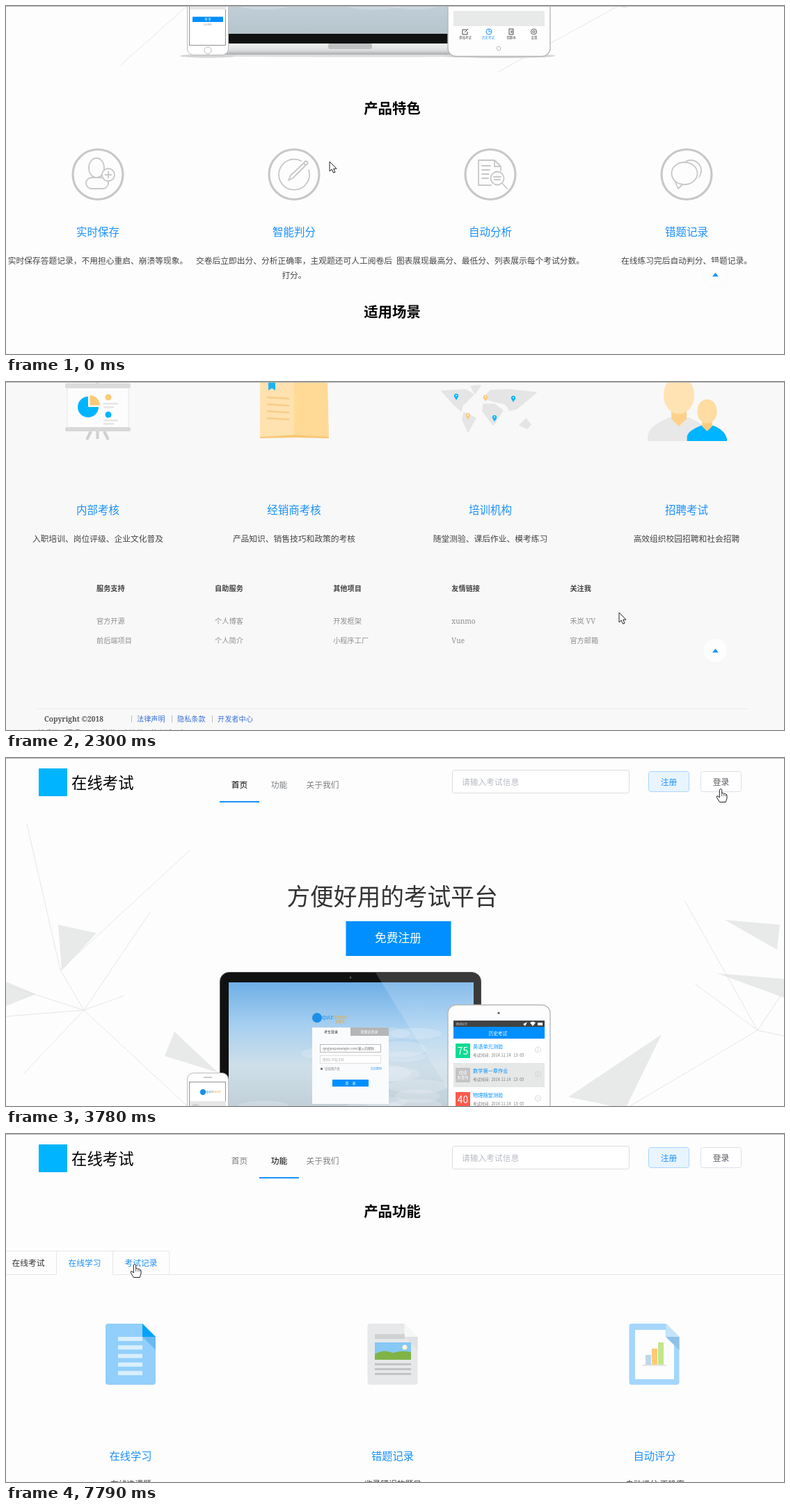
Recreate the animation shown at these times as an HTML page. Size 1118 by 501 pixels, loop 8 s.

```html
<!DOCTYPE html>
<html lang="zh-CN">
<head>
<meta charset="utf-8">
<style>
html, body { margin: 0; width: 100%; height: 100%; overflow: hidden; background: #fdfdfd; }
svg { display: block; width: 1118px; height: 501px; }
text { font-family: "Noto Sans CJK SC", "Noto Sans CJK", sans-serif; white-space: pre; }
.slab { font-family: "Noto Serif", "Noto Sans CJK SC", "Noto Sans CJK", serif; }
.thin { stroke: #c8c8c8; stroke-width: 1.8; stroke-linecap: round; stroke-linejoin: round; }
.login.on rect { fill: #e8f4ff; stroke: #badeff; }
.login.on text, .record.on text { fill: #1890ff; }
.feature.on text { fill: #000; }
</style>
</head>
<body>
<svg id="stage" viewBox="0 0 1118 501"></svg>
<script>
const BLUE = '#1890ff', FILL = '#008fff', SKY = '#00b4ff', INK = '#444', PAPER = '#fdfdfd';
const THIN = 'class="thin"';

const rect = (x, y, w, h, fill, extra = '') =>
  `<rect x="${x}" y="${y}" width="${w}" height="${h}" fill="${fill}" ${extra}/>`;
const poly = (pts, fill, extra = '') => `<polygon points="${pts}" fill="${fill}" ${extra}/>`;
const path = (d, fill, extra = '') => `<path d="${d}" fill="${fill}" ${extra}/>`;
const oval = (x, y, rx, ry, fill, extra = '') =>
  `<ellipse cx="${x}" cy="${y}" rx="${rx}" ry="${ry}" fill="${fill}" ${extra}/>`;
const dot = (x, y, r, fill, extra) => oval(x, y, r, r, fill, extra);
const stroke = (c, w = 1) => `stroke="${c}" stroke-width="${w}"`;
const line = (d, extra = THIN) => path(d, 'none', extra);
// y is the middle of the glyphs
const text = (x, y, size, str, fill = INK, extra = '') =>
  `<text x="${x}" y="${y + size * .38}" font-size="${size}" fill="${fill}" ${extra}>${str}</text>`;
const mid = (x, y, size, str, fill, extra = '') =>
  text(x, y, size, str, fill, 'text-anchor="middle" ' + extra);
const heading = (y, str) => mid(555, y, 20.4, str, '#000', 'font-weight="700"');
const group = (dy, part) => `<g transform="translate(0 ${dy})">${part}</g>`;
const each = (list, fn) => list.map(fn).join('');
const repeat = (n, fn) => each([...Array(n).keys()], fn);
const bars = (n, x, y, gap, w, h, fill) => repeat(n, i => rect(x, y + gap * i, w, h, fill));

let seed = 7;
const random = (a, b) => a + (b - a) * ((seed = seed * 16807 % 2147483647) / 2147483647);

function header(active) {
  const nav = (s, i) => `<g class="${i == 1 ? 'feature' : ''}">` +
    mid(335.5 + 57 * i + 5.5 * (i > 1), 38.5, 11.75, s, i == active ? '#000' : '#7c7e82', 'font-weight="500"') + '</g>';
  return rect(47, 15, 41, 40, SKY) + text(94, 35.5, 22.4, '在线考试', '#000') +
    each(['首页', '功能', '关于我们'], nav) + rect(307 + 57 * active, 62, 57, 2, BLUE) +
    rect(641.5, 17.5, 254, 33, '#fff', 'rx="3" ' + stroke('#d9dce2')) +
    text(655, 34.5, 11.75, '请输入考试信息', '#b6bac3') +
    rect(923.5, 19.5, 58, 29, '#e8f4ff', 'rx="3" ' + stroke('#a8d5ff')) + mid(952.5, 34.5, 11.75, '注册', BLUE) +
    '<g class="login">' + rect(998.5, 19.5, 58, 29, '#fff', 'rx="3" ' + stroke('#dcdfe6')) +
    mid(1027.5, 34.5, 11.75, '登录', '#55585e') + '</g>';
}

// a web of thin lines around two hubs, with a few grey shards
function backdrop() {
  const webs = [['112 363', ['207 222', '78 305', '0 327', '0 372', '25 455', '170 342', '270 510']],
    ['78 305', ['30 95', '265 132']],
    ['1080 392', ['975 205', '1118 335', '1118 400', '890 505', '990 325']]];
  const shards = ['75,240 130,252 80,306', '0,322 43,340 0,357', '242,394 228,429 305,453',
    '1033,233 1112,240 1108,276', '1022,310 1118,318 1118,345', '942,398 808,488 890,505'];
  return each(shards, p => poly(p, '#e8eaea')) +
    each(webs, ([hub, ends]) => line(each(ends, e => `M${hub}L${e}`), stroke('#e0e0e0', .8))) +
    line('M880 502L707 597M260 502L165 587', stroke('#e0e0e0', .8));
}

const brand = (x, y, k) => dot(x, y, 7 * k, '#1c8fe8') +
  text(x + 7 * k, y - k, 8 * k, 'quiz<tspan fill="#f5a623">moor</tspan>', '#1c8fe8');

function laptop() {
  const cloud = () => oval(random(370, 610), random(390, 510), random(30, 50), random(5, 14), '#f4f7f8', 'opacity=".22"');
  return oval(520, 573, 270, 2.5, '#ddd') +
    rect(307.5, 308.500, 375, 255, '#111', 'rx="13" ' + stroke('#555')) +
    rect(320, 323, 352, 219, 'url(#sky)') + repeat(14, cloud) +
    poly('531,309 676,309 682,318 682,540 652,505', '#fff', 'opacity=".17"') +
    dot(495, 316, 1.5, '#555') +
    path('M262 556H690V567Q680 572 650 572H290Q265 572 262 566Z', 'url(#metal)') +
    rect(463, 556, 63, 8, '#bfc1c2', 'rx="3"') +
    brand(447, 374, 1) + mid(480, 379, 4.5, '答题台', '#f5a623') +
    rect(440, 388, 110, 110, '#fafbfc') + rect(495, 388, 55, 12, '#b4b6b8') +
    mid(467, 394, 5, '考生登录', '#333') + mid(522, 394, 5, '管理员登录', '#fff') +
    rect(451.5, 412.5, 87, 11, '#fff', stroke('#aaa', .8)) + text(455, 418, 4.6, 'qinglan@example.com/输入的密码', '#666') +
    rect(451.5, 428.5, 87, 11, '#fff', stroke('#ccc', .6)) + text(455, 434, 4.4, '密码6-20位字符', '#aaa') +
    rect(452, 446, 3, 3, '#777') + text(458, 447.5, 4.4, '记住用户名', '#777') + text(524, 447.5, 4, '忘记密码', BLUE) +
    rect(469, 463, 52, 10, FILL) + mid(495, 468, 5, '登　录', '#fff');
}

function phone() {
  return oval(290, 574, 40, 2.5, '#d5d5d5') +
    rect(260.5, 453.5, 59, 119, '#fff', 'rx="9" ' + stroke('#b9bbbc')) + rect(284, 459, 12, 1.5, '#bbb') +
    rect(263.5, 466.5, 52, 92, '#fff', stroke('#777', .8)) +
    brand(283, 481, .6) + rect(264, 494, 52, 13, '#e5e7e8') +
    text(268, 500, 3.5, '请输入', '#aaa') + rect(268, 517.5, 44, 7.500, FILL) + mid(290, 521, 4, '登 录', '#fff') +
    mid(290, 529, 3, '忘记密码', '#999') + dot(290, 566, 5, '#fff', stroke('#b9bbbc'));
}

function tablet() {
  const row = ([name, score, color], i) => {
    const y = 404 + 35 * i;
    return rect(643, y, 131, 35, i == 1 ? '#e6e8e8' : '#fff') + rect(646, y + 7, 21, 21, color) +
      (score ? mid(656.5, y + 17.5, 14, score, '#fff')
        : mid(656.5, y + 14, 6, '成绩', '#fff') + mid(656.5, y + 21, 5.5, '未发布', '#fff')) +
      text(671, y + 11, 7.2, name, FILL) + text(671, y + 24, 5.6, '考试时间:  2014.11.14   13: 05', '#777') +
      dot(764.5, y + 16, 4, 'none', stroke('#ccc', .7)) + line(`M763.5 ${y + 14}l2 2l-2 2`, stroke('#bbb', .6));
  };
  const tab = (s, i) => mid(660 + 33 * i, 547, 4.4, s, i == 1 ? BLUE : '#444');
  return oval(709, 574, 80, 3, '#d5d5d5') +
    rect(635, 355.5, 147, 219, PAPER, 'rx="12" ' + stroke('#b5b7b8', 1.4)) + dot(708, 367, 1.6, '#555') +
    rect(643, 378, 131, 174, '#e8e9e9') + rect(643, 378, 131, 9, '#404244') +
    text(647, 383, 4, '移动信号', '#ddd') + poly('743,383 749,380 746,386', '#fff') +
    path('M753 381Q757 378 761 381L757 386Z', '#fff') + rect(764, 381, 7, 4, '#fff') +
    rect(643, 387, 131, 17, FILL) + mid(707, 396, 6.6, '历史考试', '#fff') +
    each([['英语单元测验', '75', '#0edc92'], ['数学第一章作业', '', '#c4c4c4'], ['物理随堂测验', '40', '#ff5a4d']], row) +
    rect(643, 531, 131, 21, '#fff') + each(['参加考试', '历史考试', '错题本', '设置'], tab) +
    line('M662 536H656V543H663V539M659 540L664 535M723 535H729V543H723ZM725 538H728M725 540H728', stroke('#444')) +
    dot(694, 539, 4, 'none', stroke(BLUE)) + line('M694 536V539H697', stroke(BLUE)) +
    dot(758.5, 539, 4, 'none', stroke('#555')) + dot(758.5, 539, 1.6, 'none', stroke('#555')) +
    rect(705.5, 560.5, 5, 5, 'none', 'rx="1" ' + stroke('#bbb'));
}

const column = i => 132 + 282 * i;
const cards = (rows, labelY, descY) => each(rows, ([label, ...desc], i) =>
  mid(column(i), labelY, 15.5, label, BLUE) +
  each(desc, (s, k) => mid(column(i), descY + 21 * k, 11.75, s, '#444')));

function features() {
  const user = rect(115, 247, 32, 16, PAPER, 'rx="8" ' + THIN) + oval(130, 233, 11, 14, PAPER, THIN) +
    dot(147, 243, 9, PAPER, THIN) + line('M142.5 243H151.5M147 238.5V247.5');
  const pencil = line('M424 223A22 22 0 1 0 435 236M406 251L409 244L428 226L431 229L413 247Z') + dot(431, 226, 2.5, PAPER, THIN);
  const report = line('M697 258H679V222H702L711 231V237M702 222V231H711') +
    repeat(4, i => line(`M684 ${230 + 6 * i}H${696 - i}`)) +
    dot(706, 248, 9.5, PAPER, THIN) + line('M713 255L720 263M701 246H711M702 250H710');
  const chat = oval(984, 237, 15, 15, 'none', THIN) + oval(975, 242, 21, 18, PAPER, 'stroke="#fdfdfd"') +
    line('M962 254L966 263L972 257') + oval(975, 241, 18.5, 16, PAPER, THIN);
  return heading(147.5, '产品特色') +
    repeat(4, i => dot(column(i), 242.5, 36, 'none', stroke('#c8c8c8', 3.2))) + user + pencil + report + chat +
    cards([['实时保存', '实时保存答题记录，不用担心重启、崩溃等现象。'],
      ['智能判分', '交卷后立即出分、分析正确率，主观题还可人工阅卷后', '打分。'],
      ['自动分析', '图表展现最高分、最低分、列表展示每个考试分数。'],
      ['错题记录', '在线练习完后自动判分、错题记录。']], 325, 366.5) +
    heading(440.5, '适用场景');
}

const pin = (x, y, c) => path(`M${x} ${y + 5}l-3 -5a3.2 3.2 0 1 1 6 0Z`, c) + dot(x, y - 1.5, 1, '#fff');

function person(x, top, k, skin, shade, shirt) {
  const y = top + 93 * k;
  return path(`M${x - 45 * k} 171V165Q${x - 44 * k} ${y - 22 * k} ${x - 14 * k} ${y - 34 * k}H${x + 14 * k}` +
    `Q${x + 44 * k} ${y - 22 * k} ${x + 45 * k} 171Z`, shirt) +
    path(`M${x - 11 * k} ${y - 48 * k}h${22 * k}v${16 * k}l${-11 * k} ${11 * k}l${-11 * k} ${-11 * k}Z`, shade) +
    rect(x - 22 * k, top, 44 * k, 54 * k, skin, `rx="${22 * k}" ry="${26 * k}"`);
}

function scenes() {
  const board = rect(129, 79, 5, 10, '#d8d8d8', 'rx="2"') +
    line('M122 157L116 169M131.5 157V168M141 157L147 169', stroke('#d0d0d0', 4)) +
    rect(88, 94, 88, 58, '#fcfcfc', stroke('#e6e6e6')) +
    rect(85, 88, 94, 7, '#dcdcdc', 'rx="2"') + rect(85, 151, 94, 6, '#d8d8d8', 'rx="2"') +
    path('M118 122v-15a15 15 0 1 0 15 15Z', SKY) + path('M120.5 119.5v-14.5a15 15 0 0 1 14.500 14.500Z', '#ffc978') +
    dot(147, 108, 4.5, '#ffc978') + dot(147, 133, 4.5, SKY) + bars(2, 140, 116, 24, 21, 2.5, '#e6e6e6') +
    bars(2, 140, 121, 24, 15, 2.5, '#e6e6e6');
  const book = poly('365,82 414,85 414,164 365,167', '#ffe2b0') + poly('414,85 462,81 464,167 414,164', '#ffd996') +
    poly('365,165 414,162 464,165 464,167 414,166 365,167', '#f8c778') + poly('377,82 387,82 387,98 382,95 377,98', '#1cb3f2') +
    repeat(4, i => line(`M375 ${108 + 10 * i}l32 2`, stroke('#f8cd86', 2.5)));
  const land = ['626,99 660,97 672,104 656,120 654,128 643,118', '668,92 682,91 674,103', '658,130 675,138 664,158 656,140',
    '686,110 696,98 722,97 762,101 735,124 724,127 718,118', '686,118 702,118 714,127 700,148 685,128', '738,148 747,139 754,147 749,153'];
  const map = each(land, p => poly(p, '#e5e5e5', stroke('#e5e5e5', 1.5) + ' stroke-linejoin="round"')) +
    pin(647, 107, SKY) + pin(729, 110, SKY) + pin(702, 138, SKY) + pin(689, 109, '#ffc978') + pin(664, 135, '#ffc978');
  const links = [['服务支持', '官方开源', '前后端项目'], ['自助服务', '个人博客', '个人简介'],
    ['其他项目', '开发框架', '小程序工厂'], ['友情链接', 'xunmo', 'Vue'], ['关注我', '禾岚 VV', '官方邮箱']];
  const link = (x, s, k) => k ? text(x, 403 + 27.5 * k, 10.2, s, '#8f8f8f', 'class="slab"')
    : text(x, 383, 10.2, s, '#444', 'font-weight="700"');
  return rect(0, 28, 1118, 700, '#f8f8f8') + board + book + map +
    person(967, 78, 1, '#ffe3b3', '#ffd18a', '#e8e8e8') + person(1007.5, 111, .64, '#ffdca2', '#ffcb7c', SKY) +
    cards([['内部考核', '入职培训、岗位评级、企业文化普及'], ['经销商考核', '产品知识、销售技巧和政策的考核'],
      ['培训机构', '随堂测验、课后作业、模考练习'], ['招聘考试', '高效组织校园招聘和社会招聘']], 270.5, 312) +
    each(links, (col, i) => each(col, (s, k) => link(130 + 170.1 * i, s, k)));
}

function footer() {
  return rect(45, 470, 1021, 1, '#ebebeb') + text(55, 485.5, 10.2, 'Copyright ©2018', '#555', 'class="slab" font-weight="700"') +
    each(['法律声明', '隐私条款', '开发者中心'], (s, i) =>
      rect(180 + 58 * i, 480, 1, 10, '#bbb') + text(188 + 58 * i, 485.5, 10.2, s, '#3b73d6')) +
    text(45, 505, 10.2, '前后端开源项目，仅供学习交流使用的考试平台', '#777');
}

const home = () => header(0) + backdrop() +
  mid(555, 199.5, 33.7, '方便好用的考试平台', '#333') +
  rect(488.5, 235, 151, 50, FILL) + mid(563.5, 259, 16.8, '免费注册', '#fff') +
  laptop() + phone() + tablet() + group(502, features()) + group(975, scenes()) + group(1061, footer());

const floppy = () => rect(143, 281, 72, 72, '#8ccbf8', 'rx="3"') +
  rect(155, 281, 48, 29, '#e6e8ea') + poly('168,281 203,281 203,310 196,310', '#d9dbdd') + rect(187, 288, 11, 18, '#64b5f0') +
  rect(155, 319, 48, 34, '#e9ebec') + bars(2, 163, 326, 8, 32, 3, '#d3d5d6') + rect(163, 343, 25, 3, '#d3d5d6');

const notepad = () => path('M519 288H576V304H592V353H522Q519 353 519 350Z', '#e9ebec') +
  path('M519 290L575 347L560 353H522Q519 353 519 350Z', '#dcdddf') + poly('576,304 576,320 592,304', '#dcdddf') +
  `<g transform="translate(524 287) rotate(44)">${rect(-3, -10, 17, 20, '#bdbfc1', 'rx="6"')}${rect(8, -10, 9, 20, '#9ccc50')}` +
  `${rect(17, -10, 39, 20, '#8ccbf8')}${rect(17, 3, 39, 7, '#559bd6')}${poly('56,-10 69,0 56,10', '#f3c67b')}${poly('64,-4 69,0 64,4', '#444')}</g>`;

const printer = () => rect(895, 313, 74, 41, '#e7e9ea', 'rx="4"') +
  path('M903 283Q903 279 907 279H945L962 296V330H903Z', '#8ccbf8') + poly('945,279 962,296 945,296', '#42a9f2') +
  rect(898, 329, 68, 5, '#b9bbbd') + mid(932, 308, 28, 'A', '#fff', 'style="font-family:Roboto,sans-serif"') +
  repeat(3, i => dot(906 + 9 * i, 343, 3, i ? '#9ccc50' : '#ff7c55'));

const sheet = (x, fill, fold, shade) =>
  path(`M${x} 277q0 -4 4 -4h49l19 19v65q0 4 -4 4h-64q-4 0 -4 -4Z`, fill) +
  poly(`${x + 53},292 ${x + 72},292 ${x + 72},311`, shade) + poly(`${x + 53},273 ${x + 72},292 ${x + 53},292`, fold);

const lesson = () => sheet(143, '#93cffc', '#00a2fb', '#6bb9f0') + bars(5, 161, 292, 12.3, 35, 6, '#d9effe');

const article = () => sheet(519.5, '#e6e8e9', '#f6f7f7', '#dfe1e2') + rect(530, 288, 43, 7, '#cfd1d2') +
  rect(530, 300, 52, 25, '#86c8f6') + dot(573, 307, 3.5, '#fff6d8') +
  path('M530 317Q542 309 556 315Q570 311 582 314V325H530Z', '#80b347') + bars(3, 530, 330, 7, 52, 3, '#c1c3c4');

const chart = () => sheet(895.5, '#a5d6fc', '#c4e4fd', '#8fc1e8') + path('M904 282H948V292L960 304V353H904Z', PAPER) +
  each(['#bcd8ea', '#ffc978', '#c2e58b'], (c, i) => rect(919 + 9 * i, 318 - 9 * i, 8, 14 + 9 * i, c)) + rect(915, 332, 34, 2, '#e4e4e4');

function panel(active) {
  const tab = (s, i) => `<g class="${i == 2 ? 'record' : ''}">` +
    mid(32 + 81 * i, 186, 11.75, s, i == active ? BLUE : '#333') + '</g>';
  const base = active ? 'M0 202.5H72.5M153.5 202.5H1118' : 'M72.5 202.5H1118';
  const items = active
    ? [['在线学习', '在线选课题'], ['错题记录', '收录错误的题目'], ['自动评分', '自动评分 正确率']]
    : [['最近发布', '查看、参与最近发布的考试'], ['模拟考试', '主观题、用户考生所答填题手动评分'], ['考试记录', '查看参与的考试记录、做到错题']];
  return each(['在线考试', '在线学习', '考试记录'], tab) +
    line('M0 168.5H232Q235 168.5 235 171V202M72.5 168.5V202M153.5 168.5V202' + base, stroke('#e4e7ea')) +
    (active ? lesson() + article() + chart() : floppy() + notepad() + printer()) +
    each(items, ([a, b], i) => mid(179 + 376.5 * i, 463, 15.3, a, BLUE) + mid(179.5 + 376.5 * i, 504, 11.75, b));
}

const stage = document.getElementById('stage');
stage.innerHTML = `<defs>
  <linearGradient id="sky" x2="0" y2="1"><stop stop-color="#6eafe6"/><stop offset=".28" stop-color="#a6cff0"/>
    <stop offset=".55" stop-color="#cfdfe9"/><stop offset="1" stop-color="#b6c4cc"/></linearGradient>
  <linearGradient id="metal" x2="0" y2="1"><stop stop-color="#f1f2f2"/><stop offset=".6" stop-color="#dcdedf"/>
    <stop offset="1" stop-color="#aaacae"/></linearGradient></defs>
  ${rect(0, 0, 1118, 501, PAPER)}
  <g id="home">${home()}</g>
  <g id="func">${header(1)}${heading(111, '产品功能')}<g id="exam">${panel(0)}</g><g id="study">${panel(1)}</g></g>
  <g id="up">${dot(1019.5, 386.5, 17.5, PAPER, stroke('#000') + ' stroke-opacity=".02"')}${poly('1015,389.5 1024,389.5 1019.5,384', '#1296f5')}</g>
  ${rect(0, 0, 1118, 1, '#b4b4b4')}
  <g id="arrow">${path('M0 0V14L3.2 11L5.6 16.2L8 15.2L5.7 10.2H10Z', '#fff', stroke('#222'))}</g>
  <g id="hand">${path('M-1.7 1.5Q0 -.8 1.7 1.5V7Q3.5 5.5 4.7 7.4Q6.5 6.3 7.2 8.3Q9 7.8 9 10V14L7.2 19.5H-1.5L-5.8 12.5Q-6 9.8 -3.5 11L-1.7 13Z', '#fff', stroke('#222'))}${line('M1.7 7V11M4.7 8V11M7.2 9V11', stroke('#222', .7))}</g>`;

// the screen refreshes in bursts: first, last, count
const bursts = [[0, 0, 1], [150, 420, 3], [1010, 2010, 8], [2160, 3060, 8], [3210, 4020, 7],
  [4760, 5270, 5], [5540, 6520, 8], [6670, 7640, 8], [7790, 7790, 1]];
// moves: start, end, then where to
const scrolls = [[0, 0, 502], [20, 420, 602], [867, 1870, 1061], [2946, 3285, 0]];
const glides = [[0, 0, 465, 224], [2031, 2750, 1031, 371, 'hand'], [3075, 4020, 1027, 36, 'hand'],
  [4632, 5270, 387, 40, 'hand'], [5600, 6520, 415, 216], [6530, 7220, 118, 187, 'hand'], [7360, 7790, 185, 187, 'hand']];

function snap(t) {
  const [a, b, n] = bursts.findLast(u => u[0] <= t);
  const step = (b - a) / (n - 1) || 1;
  return a + step * Math.min(n - 1, Math.floor((t - a) / step + 1e-6));
}

// eased progress of the latest move, and a coordinate along it
function follow(moves, t) {
  const i = moves.findLastIndex(m => m[0] <= t), to = moves[i], from = moves[i - 1] || to;
  const p = Math.min(1, (t - to[0]) / (to[1] - to[0] || 1)), e = 1 - (1 - p) ** 3;
  return { p, to, at: k => from[k] + (to[k] - from[k]) * e };
}

const $ = id => document.getElementById(id);
const show = (id, on) => $(id).style.display = on ? '' : 'none';
const mark = (cls, on) => document.querySelectorAll('.' + cls).forEach(e => e.classList.toggle('on', on));

function draw(now) {
  const t = snap(now % 8000), y = Math.round(follow(scrolls, t).at(2)), onHome = t < 5540, study = t > 7080;
  const { p, to, at } = follow(glides, t), hand = to[4] && p > .6;
  $('home').setAttribute('transform', `translate(0 ${-y})`);
  show('home', onHome);
  show('func', !onHome);
  show('exam', !study);
  show('study', study);
  show('up', onHome && y > 200);
  show('arrow', !hand);
  show('hand', hand);
  $(hand ? 'hand' : 'arrow').setAttribute('transform', `translate(${Math.round(at(2))} ${Math.round(at(3))})`);
  mark('login', t >= 4020 && t < 4760);
  mark('feature', t >= 5260);
  mark('record', t >= 7790);
  requestAnimationFrame(draw);
}
requestAnimationFrame(draw);
</script>
</body>
</html>
```
